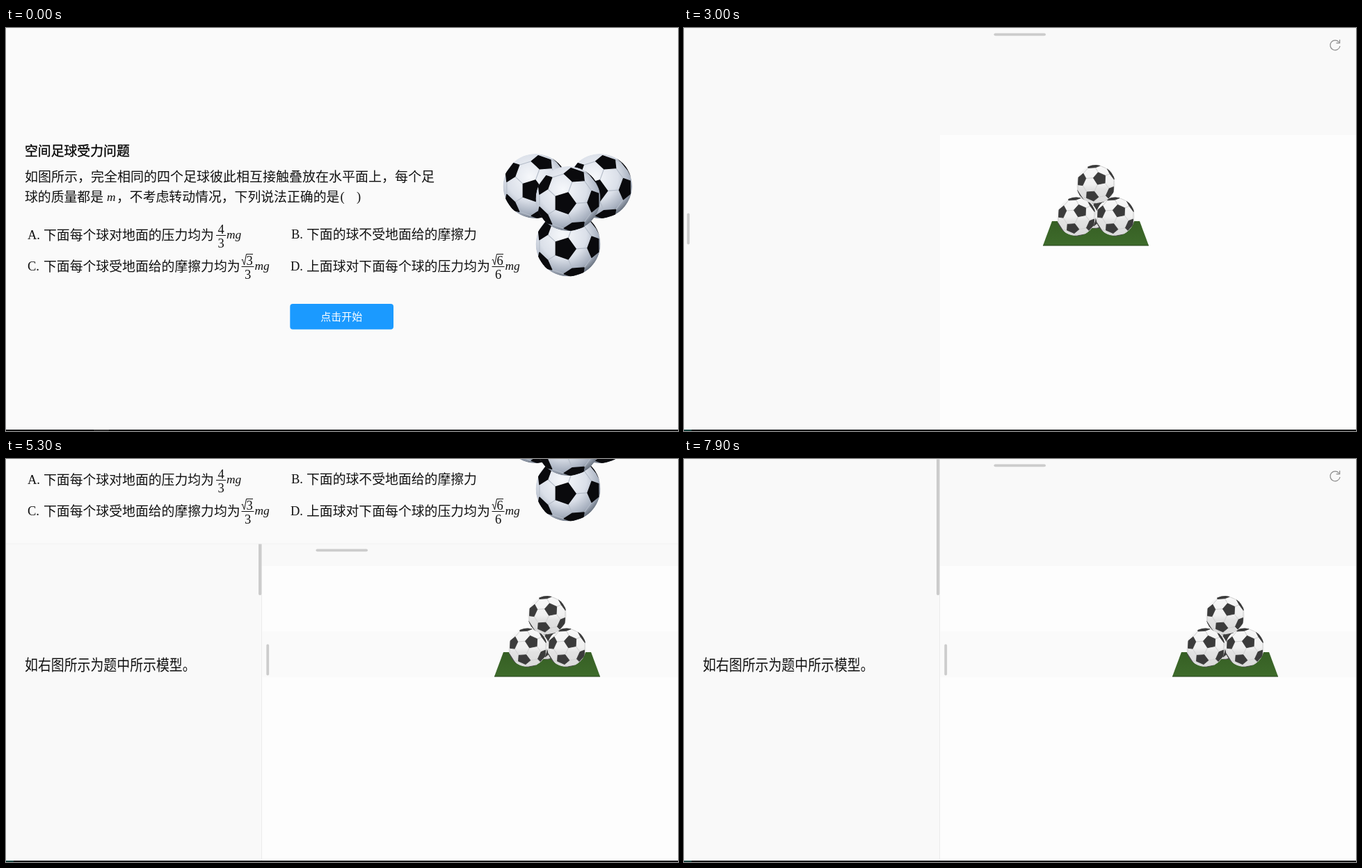
An HTML page for the animation above (8 s loop, 966 by 580 pixels).

```html
<!DOCTYPE html>
<html lang="zh-CN">
<head>
<meta charset="utf-8">
<style>
html, body { margin: 0; width: 100%; height: 100%; overflow: hidden; background: #fdfdfd; }
svg { display: block; width: 966px; height: 580px; font: 300 18.85px "Noto Sans CJK SC", "Noto Sans CJK", sans-serif; }
text { white-space: pre; fill: #111; }
.latin { font-family: "Liberation Serif", serif; font-size: 18.5px; }
.var { font-family: "Liberation Serif", serif; font-style: italic; font-size: 17.4px; }
.mid { text-anchor: middle; }
.title { font-weight: 500; fill: #000; stroke: #000; stroke-width: .3px; }
.start { font-size: 15px; font-weight: 500; fill: #fff; }
.hint { font-size: 11.2px; font-weight: 400; }
.hint, .hint text { fill: #1a96e8; }
.grip { fill: #ccc; }
</style>
</head>
<body>
<svg viewBox="0 0 966 580">
  <defs>
    <radialGradient id="glossy" cx=".42" cy=".36" r=".66">
      <stop offset="0" stop-color="#f6f8fb"/><stop offset=".55" stop-color="#dbe0e9"/>
      <stop offset=".85" stop-color="#a6afbe"/><stop offset="1" stop-color="#666f7c"/>
    </radialGradient>
    <linearGradient id="matte" x2="0" y2="1">
      <stop offset="0" stop-color="#f8f8f8"/><stop offset=".5" stop-color="#f0f0f0"/>
      <stop offset=".62" stop-color="#e2e2e2"/><stop offset="1" stop-color="#dadada"/>
    </linearGradient>
    <linearGradient id="grass" x2="0" y2="1">
      <stop offset="0" stop-color="#365f24"/><stop offset="1" stop-color="#3e6b2b"/>
    </linearGradient>
    <clipPath id="disc"><circle r="1"/></clipPath>
    <g id="photoBall"></g>
    <g id="modelBall"></g>
  </defs>

  <rect width="966" height="580" fill="#fdfdfd"/>
  <path d="M0 0H966V154H368V580H0Z" fill="#f9f9f9"/>
  <rect id="strip" x="368" y="248" width="598" height="66" fill="#fafafa"/>

  <g fill="none" stroke="#8a8a8a" stroke-width="1.2">
    <path d="M941.6 20.4A7.1 7.1 0 1 0 943 26M942.6 16.8V21.6H937.6"/>
  </g>

  <g id="model">
    <path d="M-63 278H63L76 313H-76Z" fill="url(#grass)"/>
    <path d="M-76 313H76" stroke="#24421a"/>
    <use href="#modelBall" transform="translate(0 263) scale(25.5)"/>
    <use href="#modelBall" transform="translate(-28 271.5) scale(28)"/>
    <use href="#modelBall" transform="translate(28 271.5) scale(28)"/>
    <use href="#modelBall" transform="translate(0 225) scale(28)"/>
  </g>

  <g id="side">
    <rect x="-12" width="379" height="580" fill="#f9f9f9"/>
    <path d="M367.5 0V580" stroke="#ececec"/>
    <rect class="grip" x="363" y="-4" width="4.3" height="200" rx="2"/>
    <rect class="grip" x="374.3" y="266.5" width="3.8" height="45" rx="1.9"/>
    <text transform="translate(27 303.5) scale(1 1.15)" font-size="18.9">如右图所示为题中所示模型。</text>
    <g id="sideHint" class="hint mid"></g>
  </g>

  <g id="sheet">
    <rect width="966" height="580" fill="#fafafa"/>
    <path d="M0 580H966" stroke="#f1f1f1"/>
    <rect class="grip" x="445.5" y="587.4" width="74.5" height="3.8" rx="1.9"/>
    <text id="topHint" class="hint mid" x="482.5" y="606.3">下滑展开题目</text>
    <g id="question">
      <text class="title" x="27" y="184.3">空间足球受力问题</text>
      <text x="27" y="221.3" font-size="19">如图所示，完全相同的四个足球彼此相互接触叠放在水平面上，每个足</text>
      <text x="27" y="249.5">球的质量都是</text>
      <text class="var" x="145" y="249">m</text>
      <text x="159" y="249.5">，不考虑转动情况，下列说法正确的是</text>
      <text class="latin" x="480.5" y="249">(</text>
      <text class="latin" x="504" y="249">)</text>
      <g id="choices"></g>
      <use href="#photoBall" transform="translate(761 227.5) scale(46.5)"/>
      <use href="#photoBall" transform="translate(853.5 227.5) scale(46.5)"/>
      <use href="#photoBall" transform="translate(808 311) scale(46.5)"/>
      <use href="#photoBall" transform="translate(808 245.5) scale(46.5)"/>
      <g id="start">
        <rect x="408.3" y="397" width="148.7" height="36.8" rx="4" fill="#1b9aff"/>
        <text class="start mid" x="482.3" y="420.8">点击开始</text>
      </g>
    </g>
  </g>

  <rect y="578" width="966" height="2" fill="#05080b"/>
  <rect id="seek" y="578" width="22" height="2" fill="#2a2a2a"/>
</svg>
<script>
const $ = id => document.getElementById(id);
const dot = (a, b) => a[0] * b[0] + a[1] * b[1] + a[2] * b[2];
const cross = (a, b) => [a[1] * b[2] - a[2] * b[1], a[2] * b[0] - a[0] * b[2], a[0] * b[1] - a[1] * b[0]];
const unit = a => a.map(c => c / Math.hypot(...a));
const mix = (a, b, k) => unit(a.map((c, i) => c + (b[i] - c) * k));

// Icosahedron corners: one faces the viewer, tilted towards (tx, ty)
function corners(spin, tx, ty) {
  const z = unit([tx, ty, Math.sqrt(1 - tx * tx - ty * ty)]);
  const x = unit([z[2], 0, -z[0]]), y = cross(z, x);
  const at = (polar, azimuth) => {
    const p = polar * Math.PI / 180, a = azimuth * Math.PI / 180;
    const c = [Math.sin(p) * Math.cos(a), Math.sin(p) * Math.sin(a), Math.cos(p)];
    return [0, 1, 2].map(i => c[0] * x[i] + c[1] * y[i] + c[2] * z[i]);
  };
  const list = [at(0, 0), at(180, 0)];
  for (let k = 0; k < 5; k++) list.push(at(63.435, spin + 72 * k), at(116.565, spin + 36 + 72 * k));
  return list;
}

function flat(p) {
  const k = p[2] < 0 ? 1.02 / Math.hypot(p[0], p[1]) : 1;
  return (p[0] * k).toFixed(3) + ' ' + (p[1] * k).toFixed(3);
}

function ball(id, spin, tx, ty, skin, ink, seam) {
  const pts = corners(spin, tx, ty);
  let patches = '', seams = '';
  for (const v of pts) {
    const near = pts.filter(n => n !== v && dot(n, v) > .3);
    const u = near[0].map((c, i) => c - v[i] * dot(v, near[0])), w = cross(v, u);
    const turn = n => Math.atan2(dot(n, w), dot(n, u));
    near.sort((a, b) => turn(a) - turn(b));
    if (v[2] > -.3) patches += 'M' + near.map(n => flat(mix(v, n, .335))).join('L') + 'Z';
    for (const n of near) {
      const a = mix(v, n, 1 / 3), b = mix(v, n, 2 / 3);
      if (a[2] > 0 && b[2] > 0) seams += `M${flat(a)}L${flat(b)}`;
    }
  }
  $(id).innerHTML = `<g clip-path="url(#disc)"><circle r="1" fill="url(#${skin})"/>
    <path d="${seams}" fill="none" stroke="${seam}" stroke-width=".025"/>
    <path d="${patches}" fill="${ink}" stroke="${ink}" stroke-width=".03" stroke-linejoin="round"/></g>`;
}
ball('photoBall', -71, -.11, .15, 'glossy', '#0a0a0d', '#b4bcc8');
ball('modelBall', 115, .22, -.31, 'matte', '#3b3b3b', '#d2d2d2');

// Label, text, and an optional fraction (root or plain) followed by mg
function choice(x, y, label, tx, words, fx, top, bottom, root) {
  let s = `<text class="latin" x="${x}" y="${y + 6.2}">${label}.</text><text x="${tx}" y="${y + 7}">${words}</text>`;
  if (fx) {
    const half = root ? 9 : 7;
    s += `<text class="latin mid" x="${fx + (root ? 2.5 : 0)}" y="${y - 2.5}">${top}</text>
      <text class="latin mid" x="${fx}" y="${y + 18}">${bottom}</text>
      <path d="M${fx - half} ${y + .5}h${half * 2}" stroke="#111"/>
      <text class="var" x="${fx + half + 1}" y="${y + 5}">mg</text>`;
    if (root) s += `<path d="M${fx - 9} ${y - 9}l1.5 -1l2.5 8l3 -15.5h9.5" fill="none" stroke="#111"/>`;
  }
  return s;
}
$('choices').innerHTML =
  choice(31, 298, 'A', 54, '下面每个球对地面的压力均为', 309, 4, 3) +
  choice(410, 296.5, 'B', 432, '下面的球不受地面给的摩擦力') +
  choice(31, 343, 'C', 54, '下面每个球受地面给的摩擦力均为', 347.5, 3, 3, true) +
  choice(409, 343, 'D', 432, '上面球对下面每个球的压力均为', 707.5, 6, 6, true);
$('sideHint').innerHTML = [...'左滑收起解析'].map((c, i) => `<text x="388.6" y="${253.3 + 15 * i}">${c}</text>`).join('');

const clamp = (v, lo, hi) => Math.min(hi, Math.max(lo, v));
const ease = v => (v = clamp(v, 0, 1), v < .5 ? 2 * v * v : 1 - 2 * (1 - v) ** 2);
const pull = [22, 62, 122, 182, 222, 247];
const pulled = (t, from) => t < from ? 0 : pull[Math.min(5, (t - from) / 100)];
const show = (id, on) => $(id).setAttribute('visibility', on ? 'visible' : 'hidden');
const move = (id, x, y) => $(id).setAttribute('transform', `translate(${x} ${y})`);

// The side panel slides first, then the model settles in the new centre
const slide = (t, from) => t < from ? 0 : ease((t - from + 83) / 500);
const settle = (t, from) => ease((t - from - 450) / 300);

function draw(t) {
  const intro = t < 1100;
  const bottom = intro ? 580 - (t < 500 ? 0 : clamp((t - 442) * .93, 0, 580))
    : pulled(t, 5100) - pulled(t, 7400);
  move('sheet', 0, bottom - 580);
  move('question', 0, intro ? 0 : 190);
  show('start', intro);

  const shut = slide(t, 2200), open = slide(t, 3900);
  move('side', 370 * (open - shut), 0);
  move('model', 736 + 370 * (open - shut) + 226 * settle(t, 2200) - 184 * settle(t, 3900), 0);

  show('topHint', t < 2600);
  show('sideHint', t < 2600);
  show('strip', t >= 3900);
  $('seek').setAttribute('x', intro ? 126 : -11);
  $('seek').setAttribute('fill', intro ? '#2a2a2a' : '#12403c');
}

const begin = performance.now();
function tick() {
  // The screen refreshes ten times a second
  draw(Math.floor((performance.now() - begin) % 8000 / 100) * 100);
  requestAnimationFrame(tick);
}
tick();
</script>
</body>
</html>
```
